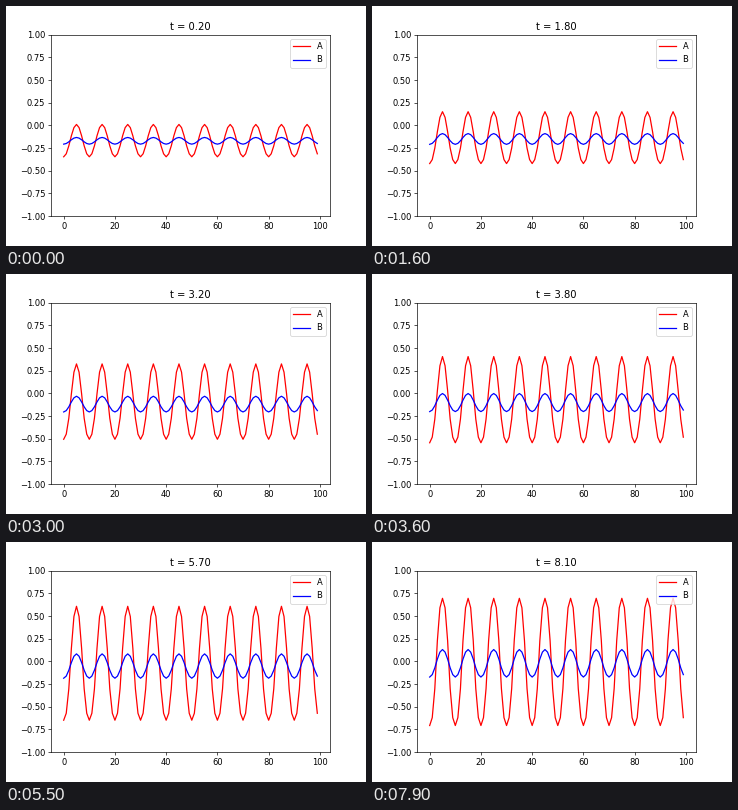
A matplotlib script for the animation above (8000 ms loop, 360 px wide and 240 px high).

```python
import matplotlib.pyplot as plt
import numpy as np
from matplotlib.animation import FuncAnimation

# Reaction-diffusion (FitzHugh-Nagumo) on a ring of cells
WIDTH, WAVES = 100, 10
DA, DB, ALPHA, BETA = 1, 100, -0.005, 10
DT, STEPS = 0.001, 100
FRAMES, FIRST = 80, 2


def laplacian(u):
    return np.roll(u, 1) + np.roll(u, -1) - 2 * u


def advance(a, b):
    for _ in range(STEPS):
        da = DA * laplacian(a) + a - a**3 - b + ALPHA
        db = DB * laplacian(b) + BETA * (a - b)
        a, b = a + DT * da, b + DT * db
    return a, b


def simulate():
    x = np.arange(WIDTH)
    a = np.cbrt(ALPHA) * (1 + np.cos(2 * np.pi * WAVES * x / WIDTH))
    b = a.copy()
    states = []
    for _ in range(FIRST + FRAMES - 1):
        a, b = advance(a, b)
        states.append((a, b))
    return states[FIRST - 1:]


states = simulate()

fig, ax = plt.subplots(figsize=(6, 4), dpi=60)
fig.subplots_adjust(left=0.125, right=0.9, bottom=0.125, top=0.88)
line_a, = ax.plot(states[0][0], color="r", label="A")
line_b, = ax.plot(states[0][1], color="b", label="B")
ax.set_xlim(-0.05 * (WIDTH - 1), 1.05 * (WIDTH - 1))
ax.set_ylim(-1, 1)
ax.set_xticks(range(0, 101, 20))
ax.set_yticks(np.linspace(-1, 1, 9))
ax.legend(loc="upper right")
title = ax.set_title("")


def update(i):
    a, b = states[i]
    line_a.set_ydata(a)
    line_b.set_ydata(b)
    title.set_text(f"t = {(i + FIRST) * STEPS * DT:.2f}")
    return line_a, line_b, title


anim = FuncAnimation(fig, update, frames=FRAMES, interval=100, repeat=True)
plt.show()
```
